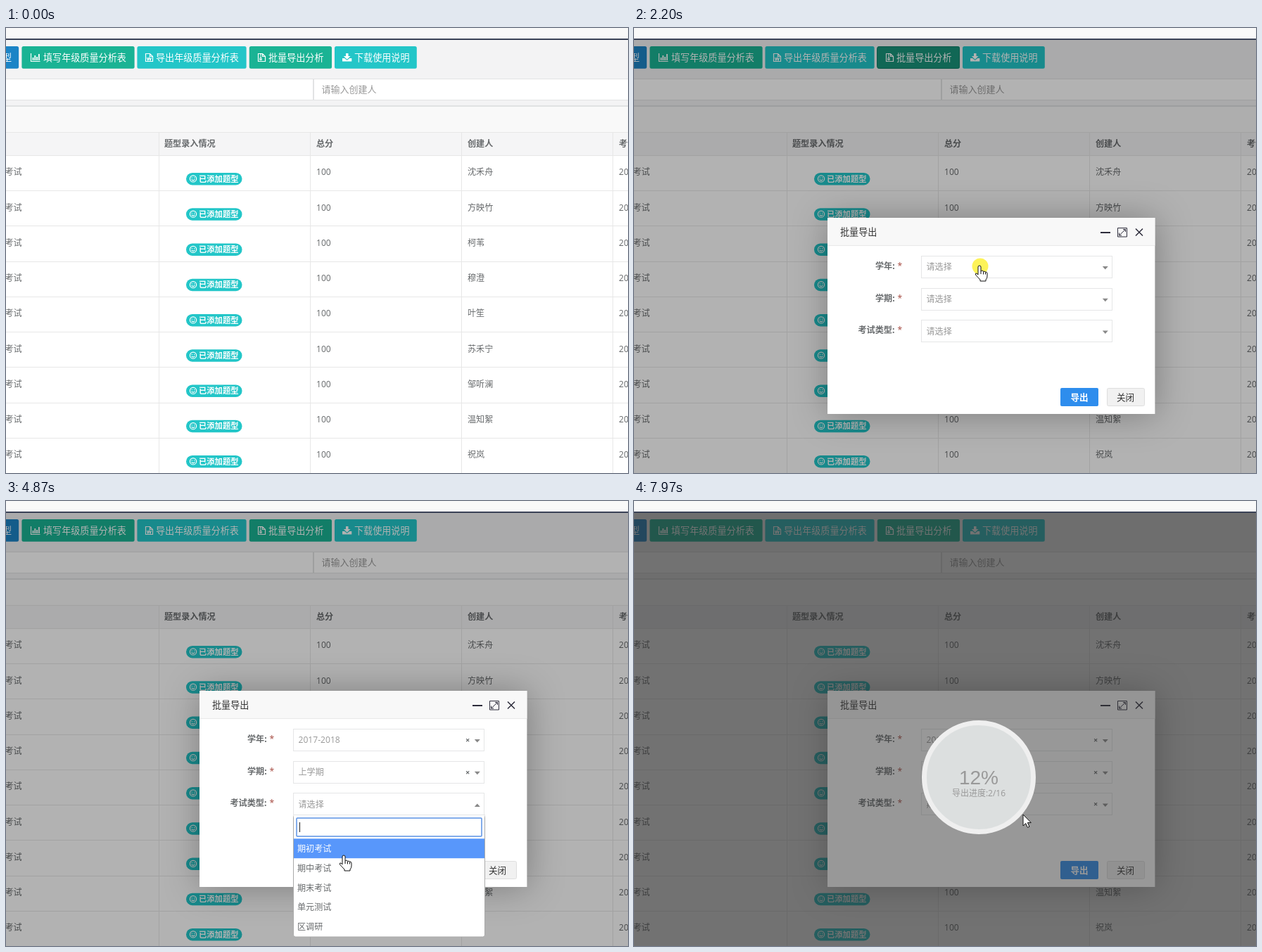
Animation, 884 px wide and 633 px high, one loop 8 s. Source, as an HTML page:

```html
<!DOCTYPE html>
<html lang="zh-CN">
<head>
<meta charset="utf-8">
<title>批量导出</title>
<style>
html, body { margin: 0; width: 100%; height: 100%; overflow: hidden; background: #fff; }
svg { display: block; width: 884px; height: 633px; }
text { font-family: "Open Sans", "Noto Sans CJK SC", "Noto Sans CJK", sans-serif; fill: #676a6c; white-space: pre; }
.b { font-weight: 700; }
.w { fill: #fff; }
.dark { fill: #333; }
.soft { fill: #999; }
.star { fill: #a5483f; }
.big { font-family: "Liberation Sans", Arial, sans-serif; }
.mid { text-anchor: middle; }
.ico { fill: none; stroke: #fff; stroke-width: 1.2; }
.win { fill: none; stroke: #2d2c3b; }
.panel { filter: drop-shadow(1px 1px 25px rgba(0, 0, 0, .3)); }
.dialog { transform-origin: 507.5px 409.5px; animation: pop 8s infinite; }
.pointer { animation: travel 8s infinite ease-in-out; }

@keyframes pop {
  0% { opacity: 0; transform: scale(.5); }
  13.94% { opacity: 0; transform: scale(.5); animation-timing-function: ease; }
  17.69%, 100% { opacity: 1; transform: none; }
}
@keyframes travel {
  0%, 1.3% { transform: translate(500px, 640px); }
  10.75%, 18.5% { transform: translate(398px, 43px); }
  26.5%, 29.25% { transform: translate(491px, 338px); }
  31% { transform: translate(484px, 388px); }
  33.75%, 39.75% { transform: translate(479px, 411px); }
  41.6%, 44.5% { transform: translate(478px, 384px); }
  47.75%, 51.25% { transform: translate(473px, 442px); }
  54.25%, 57.75% { transform: translate(478px, 428px); }
  59.9%, 61% { transform: translate(480px, 504px); }
  61.8% { transform: translate(480px, 516px); }
  63.75%, 74.4% { transform: translate(478px, 516px); }
  76.4% { transform: translate(612px, 523px); }
  78.1%, 82.5% { transform: translate(626px, 519px); }
  89.9%, 92.9% { transform: translate(554px, 447px); }
  93%, 100% { transform: translate(553px, 446px); }
}
</style>
</head>
<body>
<svg id="stage" viewBox="0 0 884 633"></svg>
<script>
const LOOP = 8000;

// Text is placed by its left edge and its vertical centre.
const text = (x, cy, str, cls = '', size = 12.1) =>
  `<text x="${x}" y="${(cy + size * .37).toFixed(2)}" class="${cls}" font-size="${size}">${str}</text>`;
const rect = (x, y, w, h, fill, more = '') =>
  `<rect x="${x}" y="${y}" width="${w}" height="${h}" fill="${fill}" ${more}/>`;
const box = (x, y, w, h, fill, line, more = '') =>
  rect(x + .5, y + .5, w - 1, h - 1, fill, `stroke="${line}" ${more}`);
// "spans" lists pairs of start and end times in ms.
const on = (spans, body) => `<g data-on="${spans}">${body}</g>`;
const icon = (d, more = '') => `<path class="ico" d="${d}" ${more}/>`;

function toolbar() {
  const plate = (x, w, fill) => rect(x + .4, 26, w - .8, 31.8, fill, 'rx="2.5"');
  const button = (x, w, fill, tx, label) => plate(x, w, fill) + text(tx, 42, label, 'w', 13.1);
  const page = x => icon(`M${x} 36.5h6l4 4v7h-10zM${x + 6} 36.5v4h4`);
  return button(-80, 98.5, '#1c84c6', -18, '题型') +
    button(22, 161, '#1ab394', 53, '填写年级质量分析表') +
    button(186, 156, '#23c6c8', 213, '导出年级质量分析表') +
    plate(345.4, 118, '#1ab394') +
    on('860 2270', box(345, 26, 118, 32, '#18937a', '#147e69', 'rx="3"')) +
    text(373, 42, '批量导出分析', 'w', 13.1) +
    button(466.6, 117.6, '#23c6c8', 495, '下载使用说明') +
    icon('M35.5 36v11.5h13') + icon('M38.5 46v-4M41.3 46v-7M44.1 46v-5M46.9 46v-9', 'style="stroke-width:1.8"') +
    page(198.5) + icon('M200.5 42l1.3 4 1.6-4 1.6 4 1.3-4') +
    page(358.5) + icon('M362 37v5', 'stroke-dasharray="1 1" style="stroke-width:2"') + icon('M361 43h2v2.5h-2z') +
    '<path class="w" d="M483 36h3.5v4h3l-4.8 4.8-4.8-4.8h3.1z"/>' +
    '<path class="w" d="M478 43h3.2l3.5 3 3.5-3h3.1v4.5h-13.3z"/>';
}

function table() {
  const people = ['沈禾舟', '方映竹', '柯苇', '穆澄', '叶笙', '苏禾宁', '邹听澜', '温知絮', '祝岚'];
  const line = '#e7e7e7';
  const rows = people.map((name, i) => {
    const y = 205 + 50.25 * i, by = y + 9.4;
    return rect(0, Math.round(y - 24.1), 884, 1, line) +
      text(-1.5, y, '考试') + text(441, y, '100') + text(656, y, name) + text(871, y, '2018') +
      rect(256, by - 8.5, 79.5, 17.5, '#23c6c8', 'rx="8.7"') +
      `<g transform="translate(266 ${by})"><circle r="4.6" class="ico"/>` +
      icon('M-2.3 1Q0 4 2.3 1M-1.7-2v1.4M1.7-2v1.4') + '</g>' +
      text(274, by, '已添加题型', 'b w', 11.3);
  }).join('');
  const heads = [[225, '题型录入情况'], [441, '总分'], [656, '创建人'], [871, '考试时间']];
  return rect(0, 148, 884, 33, '#f5f5f6') + rect(0, 148, 884, 1, line) +
    heads.map(([x, s]) => text(x, 164.4, s, 'b')).join('') + rows +
    [217, 432, 647, 862].map(x => rect(x, 148, 1, 485, line)).join('');
}

function field(i, label, lx, value, open, chosen) {
  const y = 324 + 45.7 * i, cy = y + 16;
  const tri = up => `<path fill="#888" d="M665.8 ${cy + (up ? 3.5 : -1)}h8l-4 ${up ? -4.5 : 4.5}z"/>`;
  return text(lx, cy - 1.5, label + ':', 'b') + text(374.5, cy - 1.5, '*', 'star') +
    box(408, Math.round(y), 272, 32, '#fff', '#e5e6e7') +
    on(`0 ${chosen}`, text(415.5, cy, '请选择', 'soft')) +
    on(`${chosen} ${LOOP}`, text(415.5, cy, value, 'soft') + text(653, cy, '×', 'b', 11)) +
    on(`0 ${open} ${chosen} ${LOOP}`, tri(false)) + on(`${open} ${chosen}`, tri(true));
}

function dropdown(i, items, open, close, caretOff, next) {
  const y = Math.round(355.6 + 45.7 * i), step = 27.9, top = y + 33.3;
  const label = (n, cls) => text(414, top + (n + .5) * step, items[n], cls);
  const pick = n => rect(409, top + n * step, 271, step, '#5897fb') + label(n, 'w');
  const marks = next ? on(`${open} ${next}`, pick(0)) + on(`${next} ${close}`, pick(1)) : pick(0);
  return on(`${open} ${close}`,
    box(408, y - 1, 273, 35 + items.length * step, '#fff', '#aaa', 'rx="3"') +
    rect(409, y - 1, 271, 3, '#fff') + rect(408, y - 1, 273, 1, '#e5e6e7') +
    rect(413, y + 4, 263, 26, '#fff', 'stroke="#5b92e5" stroke-width="1.5" rx="1"') +
    on(`${open} ${caretOff}`, rect(417, y + 10, 1, 14, '#222')) +
    items.map((_, n) => label(n)).join('') + marks);
}

function dialog() {
  return '<g class="dialog">' +
    rect(275, 270, 465.4, 279, '#fff', 'class="panel"') +
    rect(275, 270, 465.4, 39, '#f8f8f8') + rect(275, 309, 465.4, 1, '#e9e9e9') +
    text(293, 290, '批量导出', 'dark', 13.1) +
    rect(663, 290, 14, 2, '#2d2c3b') +
    '<path class="win" d="M687.5 284.5h13v12.5h-13zM695 286.5h3.5v3.5M698.5 286.5l-9 8.5M693 295h-3.5v-3.5"/>' +
    '<path class="win" stroke-width="1.5" d="M713 285.5l10 10M723 285.5l-10 10"/>' +
    field(0, '学年', 343, '2017-2018', 2270, 2950) +
    field(1, '学期', 343, '上学期', 3480, 4100) +
    field(2, '考试类型', 318.5, '期中考试', 4600, 5400) +
    rect(606, 512, 54, 26, '#2e8ded', 'rx="2"') +
    on('6200 6350', rect(606, 512, 54, 26, '#58a4f1', 'rx="2"')) +
    text(633, 525, '导出', 'b w mid', 12.6) +
    box(672, 512, 54, 26, '#f1f1f1', '#dedede', 'rx="2"') +
    text(698.5, 525, '关闭', 'dark mid', 12.6) +
    dropdown(0, ['2017-2018', '2016-2017'], 2270, 2950, 2720) +
    dropdown(1, ['上学期', '下学期'], 3480, 4100, 4100) +
    dropdown(2, ['期初考试', '期中考试', '期末考试', '单元测试', '区调研'], 4600, 5400, 5100, 4950) +
    '</g>';
}

function progress() {
  return on(`6350 ${LOOP}`,
    rect(0, 17, 884, 616, 'rgba(50,50,50,.5)') +
    '<circle cx="490" cy="393" r="77.5" fill="#dcdfdf" stroke="#efefef" stroke-width="7"/>' +
    on('6350 7960', text(490, 392.5, '0%', 'big soft mid', 28)) +
    on(`7960 ${LOOP}`, text(490, 392.5, '12%', 'big soft mid', 28) +
      text(490, 415.5, '导出进度:2/16', 'soft mid', 12)));
}

function pointer() {
  const arrow = 'M0 0V16L3.8 12.6 6.4 18.4 8.9 17.3 6.4 11.6H11.3Z';
  const hand = 'M-2 2Q-2 0 0 0Q2 0 2 2V8Q3 6.5 5 7.5L5.5 8.5Q7 7.5 8.5 9Q10.5 8.5 11 11V15' +
    'Q11 18 9 20V22H1V20Q-2 17-5.5 13Q-6.5 10.5-4 11L-2 13Z';
  const shape = d => `<path d="${d}" fill="#fff" stroke="#111" stroke-linejoin="round"/>`;
  return '<g class="pointer">' +
    on('980 1115 2120 2270 2870 2950 3400 3480 4020 4100 4520 4600 5250 5400',
      '<circle cx="1" cy="1" r="11.5" fill="#fdf13c" opacity=".85"/>') +
    on(`0 2060 2950 3260 5400 ${LOOP}`, shape(arrow)) +
    on('2060 2950 3260 5400', shape(hand) + '<path d="M2 8v4M5.5 9v3.5M8.5 9.5v3" stroke="#111" fill="none"/>') +
    '</g>';
}

const stage = document.getElementById('stage');
stage.innerHTML =
  rect(0, 0, 884, 633, '#fff') +
  rect(0, 0, 884, 15, '#f9f9f9') +
  rect(0, 17, 884, 94, '#f3f3f4') +
  toolbar() +
  box(-5, 72, 442, 31, '#fff', '#e2e3e4') + box(437, 72, 460, 31, '#fff', '#e2e3e4') +
  text(448.5, 87.4, '请输入创建人', 'soft', 13) +
  rect(0, 110, 884, 2, '#e0e2e3') + rect(0, 112, 884, 36, '#f9f9f9') +
  table() +
  on(`1115 ${LOOP}`, rect(0, 17, 884, 616, 'rgba(0,0,0,.3)')) +
  rect(0, 15, 884, 2, '#3a4256') +
  dialog() + progress() + pointer();

// Turn each list of spans into stepped opacity keyframes.
const css = [];
stage.querySelectorAll('[data-on]').forEach((el, i) => {
  const stops = el.dataset.on.split(' ').map((t, n) => `${t / LOOP * 100}%{opacity:${n % 2 ? 0 : 1}}`);
  css.push(`@keyframes on${i}{0%{opacity:0}${stops.join('')}}`);
  el.style.animation = `on${i} ${LOOP}ms step-end infinite`;
});
const sheet = document.createElement('style');
sheet.textContent = css.join('\n');
document.head.append(sheet);
</script>
</body>
</html>
```
